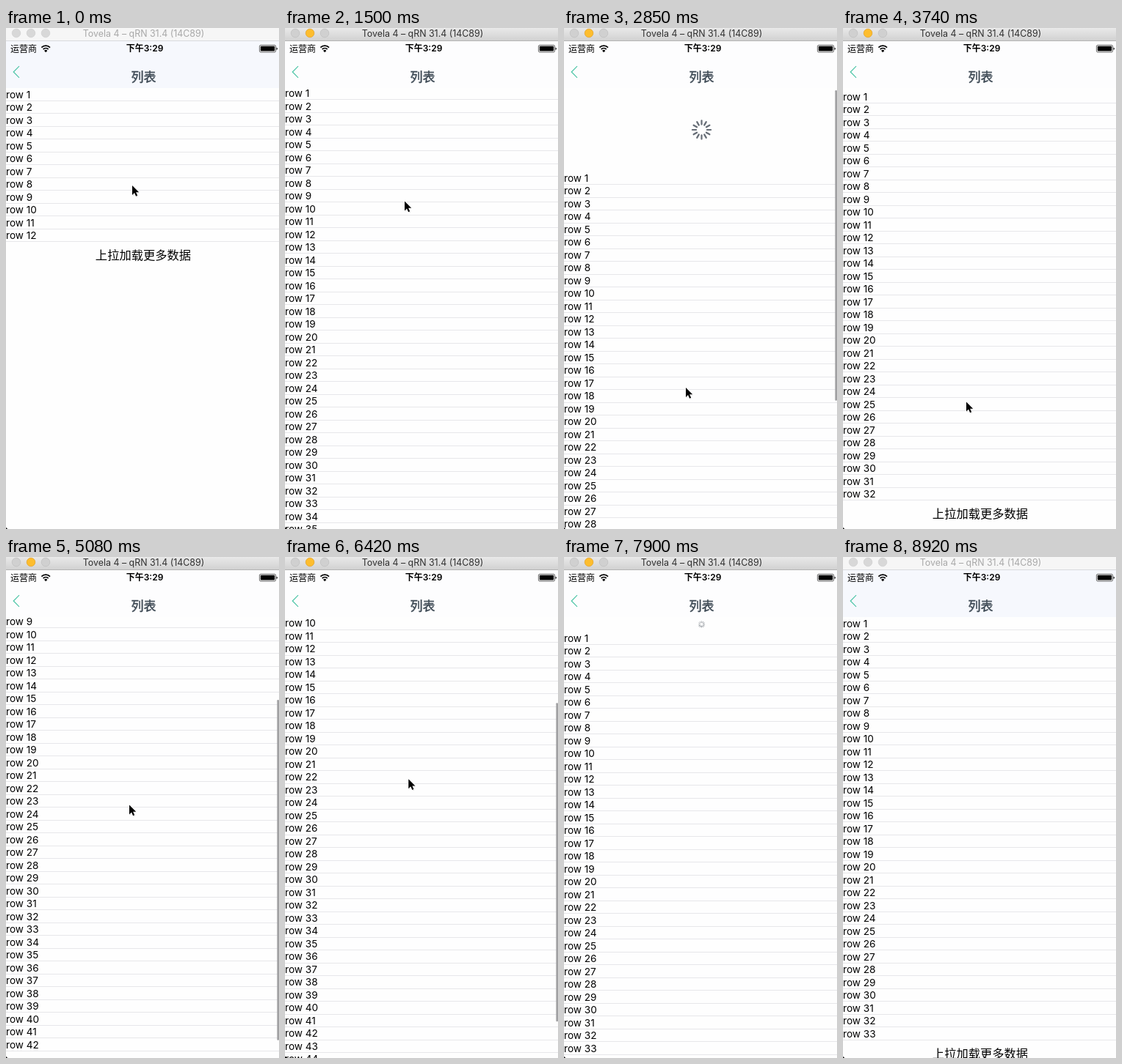
Write an HTML page that moves like this. It is 372x684 px and loops after 9.02 s.

```html
<!DOCTYPE html>
<html lang="zh">
<head>
<meta charset="utf-8">
<title>列表</title>
<style>
html, body { margin: 0; width: 100%; height: 100%; overflow: hidden; background: #fefefe; }
svg { display: block; width: 100%; height: 100%; }
text { font-family: Inter, "Noto Sans CJK SC", "Noto Sans CJK", sans-serif; white-space: pre; }
.row { font-size: 13.6px; }
.mid { text-anchor: middle; }
</style>
</head>
<body>
<svg viewBox="0 0 372 684" xmlns="http://www.w3.org/2000/svg">
  <defs>
    <linearGradient id="chrome" x1="0" y1="0" x2="0" y2="1">
      <stop offset="0" stop-color="#e9e9e9"/>
      <stop offset="1" stop-color="#d0d0d0"/>
    </linearGradient>
  </defs>
  <rect width="372" height="684" fill="#fefefe"/>
  <g id="rows"></g>
  <text id="footer" class="mid" x="187" font-size="16.3">上拉加载更多数据</text>
  <g id="spinner" stroke="#525a64" stroke-width="2.2" stroke-linecap="round"></g>
  <rect id="bar" x="369.4" width="2.6" rx="1.2" fill="#a0a0a2"/>
  <rect id="nav" y="17" width="372" height="65"/>
  <path d="M18 52.2L10.2 60L18 67.8" fill="none" stroke="#4cc5a6" stroke-width="1.2"/>
  <text class="mid" x="187.5" y="73" font-size="17" fill="#3c4853" stroke="#3c4853" stroke-width=".4">列表</text>
  <text x="6" y="32.5" font-size="12">运营商</text>
  <g fill="none" stroke="#000" stroke-width="1.8">
    <path d="M48.4 26.6a8.2 8.2 0 0 1 11.6 0M50.7 29a5 5 0 0 1 7 0"/>
    <path d="M54.2 33.2l-2.1-2.3a3 3 0 0 1 4.2 0z" fill="#000" stroke="none"/>
  </g>
  <text class="mid" x="189" y="32.4" font-size="12" font-weight="600">下午3:29</text>
  <rect x="345.4" y="23.4" width="22.2" height="9.6" rx="1.8" fill="#fff" stroke="#000" stroke-width=".6"/>
  <rect x="346.8" y="24.8" width="19.4" height="6.8" rx=".8"/>
  <path d="M368.6 26.4q1.3 .5 1.3 1.8t-1.3 1.8z"/>
  <rect id="chromeBg" width="372" height="18"/>
  <rect id="chromeLine" y="17" width="372" height="1"/>
  <g id="lights" stroke-width=".7"></g>
  <text id="title" class="mid" x="187.5" y="11.8" font-size="12.4">Tovela 4 – qRN 31.4 (14C89)</text>
  <path d="M0 681.5V684H2.5Q.6 683.4 0 681.5z"/>
  <g id="cursor">
    <path d="M1 1.5v13l3 -2.9 2.1 4.6 2.1-.9-2.1-4.5h4.1z" fill="#000" opacity=".2"/>
    <path d="M0 .5v12.9l3-2.9 2.1 4.7 2.1-.9-2.1-4.5h4.1z" stroke="#fff" stroke-width="1.8" paint-order="stroke"/>
  </g>
</svg>
<script>
const LOOP = 9020, LAST = 60;
const ROW_H = 17.5, TOP = 82, VIEW = 602, FOOT = 37, BAR_H = 596, INSET = 60, FULL_PULL = 114;
const $ = id => document.getElementById(id);
const set = (el, attrs) => { for (const k in attrs) el.setAttribute(k, attrs[k]); };
const clamp = (v, lo = 0, hi = 1) => Math.min(hi, Math.max(lo, v));
const mix = (a, b, p) => a + (b - a) * p;
function add(parent, tag, attrs, text) {
  const el = document.createElementNS("http://www.w3.org/2000/svg", tag);
  set(el, attrs);
  if (text) el.textContent = text;
  parent.appendChild(el);
  return el;
}

// The screen updates about every 150 ms, slightly faster after 3 s.
const tickStart = i => 150 * i - 10 * Math.max(0, Math.floor((i - 20) / 5));
function tickAt(ms) {
  let i = LAST;
  while (tickStart(i) > ms) i--;
  return i;
}

const linear = p => p;
const smooth = p => (1 - Math.cos(p * Math.PI)) / 2;
const out = p => 1 - (1 - p) ** 3;

// Each gesture leads pointer and list from where they are to a new pose.
const gestures = [
  { from: -1, to: 0, x: 172, y: 214.5, scroll: 0, rows: 12 },
  { from: 1, to: 4, x: 163, y: 198, scroll: 24, ease: smooth },
  { from: 4, to: 7, x: 162, y: 225, scroll: 1.5, rows: 36, ease: out },
  { from: 9, to: 11, x: 164, y: 247 },
  { from: 12, to: 19, x: 166, y: 490.5, scroll: -114.2, ease: smooth },
  { from: 19, to: 21, x: 168, y: 510, scroll: -150, mode: "spin" },
  { from: 21, to: 25, scroll: -3, rows: 32, mode: "close", ease: out },
  { from: 25, to: 27, scroll: 0, mode: "close" },
  { from: 27, to: 28, y: 513 },
  { from: 29, to: 34, y: 338, scroll: 142.5, rows: 42, ease: smooth },
  { from: 34, to: 37, y: 290, scroll: 177.5, rows: 45, ease: out },
  { from: 42, to: 48, x: 172, y: 480, scroll: -115, ease: smooth },
  { from: 48, to: 49, y: 510.5, scroll: -158.5, rows: 14, mode: "spin" },
  { from: 50, to: 56, x: 195, y: 710, scroll: 0, rows: 33, mode: "close", ease: out }
];
// Values a gesture leaves out carry over from the one before.
const poses = [];
gestures.forEach((g, i) => poses.push({ ...poses[i - 1], mode: "drag", ease: linear, ...g, scrolls: "scroll" in g }));

function stateAt(t) {
  const i = poses.findLastIndex(g => g.from < t);
  const b = poses[i], a = poses[i - 1] || b;
  const raw = clamp((t - b.from) / (b.to - b.from)), p = b.ease(raw);
  const bar = i === 0 || !b.scrolls ? 0 : b.mode === "close" ? 1 - 2 * raw : b.mode === "spin" || t <= b.to ? 1 : 0;
  return {
    t, rows: b.rows, mode: b.mode, bar: clamp(bar),
    x: mix(a.x, b.x, p), y: mix(a.y, b.y, p), scroll: mix(a.scroll, b.scroll, p)
  };
}

const rows = Array.from({ length: 45 }, (_, i) => {
  const g = add($("rows"), "g", {});
  return {
    g,
    label: add(g, "text", { class: "row", x: 0 }, "row " + (i + 1)),
    line: add(g, "rect", { width: 372, height: 1, fill: "#e7e7ea" })
  };
});
const spokes = Array.from({ length: 12 }, (_, i) =>
  add($("spinner"), "path", { d: "M0 -7.4V-12.6", transform: `rotate(${i * 30})` }));
const lights = [14, 34, 54].map(x => add($("lights"), "circle", { cx: x, cy: 7, r: 5.8 }));

function drawWindow(active) {
  set($("chromeBg"), { fill: active ? "url(#chrome)" : "#f6f6f6" });
  set($("chromeLine"), { fill: active ? "#b4b4b4" : "#d9dade" });
  set($("title"), { fill: active ? "#303030" : "#a8a8a8" });
  set($("nav"), { fill: active ? "#fdfdfe" : "#f6f8fd" });
  lights.forEach((c, i) => {
    const lit = active && i === 1;
    set(c, {
      fill: lit ? "#fdbd2e" : active ? "#d0d0d0" : "#d8d8d8",
      stroke: lit ? "#e0a028" : active ? "#bdbdbd" : "#cecece"
    });
  });
}

// Text and rules sit on whole pixels.
function drawList(s) {
  const y = TOP - s.scroll;
  rows.forEach((row, i) => {
    const top = y + i * ROW_H;
    set(row.g, { display: i < s.rows ? "inline" : "none" });
    set(row.label, { y: Math.round(top + 13.7) });
    set(row.line, { y: Math.ceil(top + ROW_H) - 1 });
  });
  set($("footer"), { y: Math.round(y + s.rows * ROW_H + 24) });
}

function drawBar(s) {
  const content = s.rows * ROW_H + FOOT, max = Math.max(0, content - VIEW);
  const size = Math.min(BAR_H, BAR_H * VIEW / content);
  const above = Math.max(0, -s.scroll - (s.mode === "spin" ? INSET : 0));
  const below = Math.max(0, s.scroll - max);
  const part = max ? clamp(s.scroll / max) : 0;
  set($("bar"), {
    y: 85 + part * (BAR_H - size) + below,
    height: Math.max(8, size - above - below),
    opacity: s.bar
  });
}

function drawSpinner(s) {
  const pull = Math.max(0, -s.scroll), dragging = s.mode === "drag";
  const scale = { drag: 1, spin: 1.2, close: Math.min(1, pull / INSET) }[s.mode];
  set($("spinner"), {
    display: pull > 8 ? "inline" : "none",
    transform: `translate(187.5 ${TOP + Math.min(pull, FULL_PULL) / 2}) scale(${scale})`
  });
  spokes.forEach((spoke, i) => {
    const age = (s.t * 2 - 98 - i + 120) % 12;
    set(spoke, { opacity: dragging ? (pull / FULL_PULL * 12 > i ? .88 : 0) : .92 - age * .036 });
  });
}

function draw(ms) {
  const s = stateAt(tickAt(ms));
  drawWindow(s.t > 0 && s.t < LAST);
  drawList(s);
  drawBar(s);
  drawSpinner(s);
  set($("cursor"), { transform: `translate(${s.x} ${s.y})` });
}

const began = performance.now();
function loop() {
  draw((performance.now() - began) % LOOP);
  requestAnimationFrame(loop);
}
loop();
</script>
</body>
</html>
```
